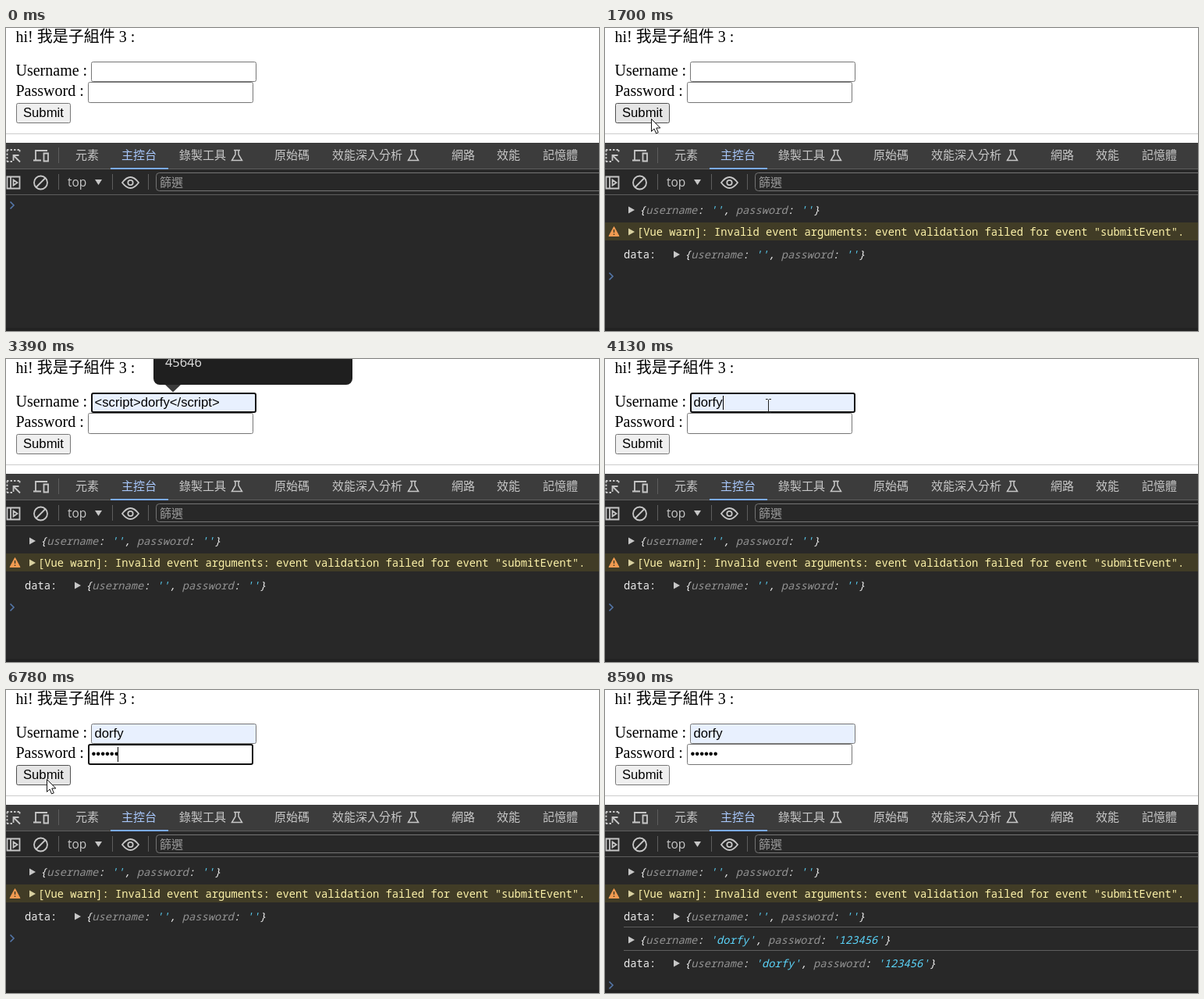
Write an HTML page that moves like this. It is 760 px wide and 388 px high and loops after 9600 ms.

```html
<!DOCTYPE html>
<html lang="zh-Hant">
<head>
<meta charset="utf-8">
<title>Form events in the console</title>
<style>
  html, body { margin: 0; width: 100%; height: 100%; overflow: hidden; background: #fff; }
  svg { display: block; width: 760px; height: 388px; }
  text { white-space: pre; }
  .page { font: 20px "Liberation Serif", "Noto Sans CJK TC", "Noto Sans CJK JP", serif; }
  .thin { font-weight: 300; }
  .field { font: 16.67px "Liberation Sans", sans-serif; }
  .ui { font: 15px "Open Sans", "Noto Sans CJK TC", "Noto Sans CJK JP", sans-serif; fill: #c7c7c7; }
  .log { font: 500 13.75px "Noto Sans Mono", monospace; fill: #ececec; }
  .obj { font-style: italic; }
  .key { fill: #939393; }
  .str { fill: #5cd5fb; }
  .icon { fill: none; stroke: #c7c7c7; stroke-width: 1.8; }
  .sep { stroke: #5e5e5e; }
</style>
</head>
<body>
<svg id="stage" viewBox="0 0 760 388">
  <rect width="760" height="388" fill="#fff"/>
  <g class="page">
    <text class="thin" x="12.5" y="18">hi! 我是子組件 3 :</text>
    <text x="12.5" y="61">Username :</text>
    <text x="12.5" y="87">Password :</text>
  </g>
  <rect id="userBox" rx="2"/>
  <rect id="passBox" rx="2"/>
  <rect id="button" x="13.5" y="96.5" width="69" height="25" rx="2"/>
  <g class="field">
    <text id="user" x="113.5" y="61"></text>
    <text id="pass" x="109.5" y="87"></text>
    <text x="22" y="114">Submit</text>
  </g>
  <rect id="caret" width="1"/>
  <path d="M0 135.5H760" stroke="#ccc"/>

  <rect y="147" width="760" height="241" fill="#282828"/>
  <rect y="147" width="760" height="33" fill="#3c3c3c"/>
  <path class="sep" d="M0 180.5H760M0 213.5H760M67.5 153V173M67.5 187V207M136.5 187V207M182.5 187V207"/>
  <rect x="134" y="179" width="74" height="2" fill="#7cacf8"/>
  <rect y="384" width="760" height="4" fill="#222"/>
  <g id="tabs" class="ui"></g>
  <g class="icon">
    <path d="M1 156h17" stroke-dasharray="2.5 2"/>
    <path d="M1.5 156v15M17.5 156v4M1 171h7" stroke-dasharray="2.5 2"/>
    <path d="M18 171.5l-8-8M9.5 170v-7h7"/>
    <path d="M38 169v-12h15M35 169.5h10M48.5 160.5h5.5v10h-5.5z"/>
    <path d="M1.5 190.5h16v15h-16zM6 190v16M9.5 194.5v7l5-3.5z"/>
    <circle cx="44.5" cy="198" r="8.5"/><path d="M38.5 204l12-12"/>
    <path d="M149 198q10.5-14 21 0q-10.5 14-21 0z"/><circle cx="159.5" cy="198" r="3.2"/>
  </g>
  <text class="ui" x="79" y="203" style="font-size:15.5px">top</text>
  <path d="M114 194h9l-4.5 7z" fill="#c7c7c7"/>
  <rect x="192.5" y="185.5" width="600" height="23" rx="4" fill="#282828" stroke="#757575"/>
  <text class="ui" x="197" y="203" style="fill:#9a9a9a">篩選</text>

  <g id="first" class="log"></g>
  <g id="second" class="log"></g>
  <path id="prompt" d="M5.5 -4.5l4.5 4.5l-4.5 4.5" fill="none" stroke="#5577aa" stroke-width="1.6"/>

  <g id="popup">
    <path d="M203 32h22l-11 10.5z" fill="#3a3a3a"/>
    <rect x="189" y="-60" width="255" height="93" rx="8" fill="#1f1f1f"/>
    <text class="ui" x="204" y="10" style="font-size:16.4px;fill:#e3e3e3">45646</text>
  </g>
  <circle id="halo" r="15" fill="#f7e44c" style="mix-blend-mode:multiply"/>
  <path id="arrow" d="M.5 .5V16.5L4 13L6.5 19L9.3 17.8L6.8 12H11.8z" fill="#fff" stroke="#111"/>
  <path id="beam" d="M-3 -8.5H-.5L.5 -7.5L1.5 -8.5H4M.5 -7.5V7.5M-3 8.5H-.5L.5 7.5L1.5 8.5H4" fill="none" stroke="#222"/>
</svg>
<script>
const LOOP = 9600;
const NAME = 'dorfy';
const $ = id => document.getElementById(id);
const set = (id, attrs) => { for (const k in attrs) $(id).setAttribute(k, attrs[k]); };
const show = (id, on) => set(id, { visibility: on ? 'visible' : 'hidden' });
const within = (t, spans) => spans.some(([a, b]) => t >= a && t < b);

// Static parts
const flask = x => `<path class="icon" style="stroke-width:1.5" transform="translate(${x} 163)"
  d="M-4-6.5h8M-2-6v5l-4.5 7.5h13l-4.5-7.5v-5"/>`;
const tabs = [[89, '元素'], [148, '主控台'], [222, '錄製工具'], [344, '原始碼'],
  [418, '效能深入分析'], [571, '網路'], [629, '效能'], [688, '記憶體']];
$('tabs').innerHTML = tabs.map(([x, s]) =>
  `<text x="${x}" y="168"${x === 148 ? ' style="fill:#a8c7fa"' : ''}>${s}</text>`).join('') + flask(296) + flask(522);

const expander = (x, y, color = '#c7c7c7') =>
  `<path d="M${x} ${y - 4.5}l8 4.5l-8 4.5z" fill="${color}"/>`;
const entry = (x, y, user, pass) => {
  const pair = (key, value) => `<tspan class="key">${key}</tspan>: <tspan class="str">'${value}'</tspan>`;
  return expander(x - 14, y) +
    `<text class="obj" x="${x}" y="${y + 5}">{${pair('username', user)}, ${pair('password', pass)}}</text>`;
};
const label = y => `<text x="24" y="${y + 5}">data:</text>`;

$('first').innerHTML = entry(44, 233, '', '') +
  `<rect y="249" width="760" height="23" fill="#413c26"/>
   <path d="M11.5 254.5l6.5 12h-13z" fill="#f29b52" stroke="#f29b52" stroke-linejoin="round"/>
   <path d="M11.5 258v4M11.5 263.5v1.5" stroke="#413c26" stroke-width="1.5"/>` +
  expander(30, 261, '#d8d0a0') +
  `<text x="41" y="266" style="fill:#fdf3aa">[Vue warn]: Invalid event arguments: event validation failed for event "submitEvent".</text>` +
  label(290) + entry(102, 290, '', '');
$('second').innerHTML = '<path class="sep" d="M24 303.5H760M24 333.5H760"/>' +
  entry(44, 320, NAME, '123456') + label(350) + entry(102, 350, NAME, '123456');

// Pointer path: time, x, y
const path = [
  [200, 688, 325], [410, 505, 106], [550, 350, 95], [830, 110, 102], [1040, 59, 116],
  [2380, 59, 116], [2720, 170, 67],
  [3120, 170, 67], [3320, 213, -22],
  [3860, 213, -22], [4000, 213, 45], [4130, 209, 60], [4400, 186, 85],
  [6430, 186, 85], [6640, 52, 114],
  [7970, 52, 114], [8590, 690, 390]
];
const STEP = 68;
const pointer = t => {
  const i = path.findIndex(p => p[0] > t) - 1;
  if (i < 0) return null;
  const [t0, x0, y0] = path[i], [t1, x1, y1] = path[i + 1];
  const k = Math.floor((t - t0) / STEP) * STEP / (t1 - t0);
  return [Math.round(x0 + (x1 - x0) * k), Math.round(y0 + (y1 - y0) * k)];
};
const over = (p, x, y, w, h) => p[0] >= x && p[0] < x + w && p[1] >= y && p[1] < y + h;

const clicks = [[1500, 1700], [2720, 2860], [4470, 4610], [7110, 7310]];
const presses = [clicks[0], clicks[3]];
const carets = [[2860, 3320], [3930, 5010], [5210, 6230], [6780, 7110]];
const keys = [5210, 5280, 5350, 5550, 5620, 5680];

function field(id, x, y, w, h, focused, fill) {
  const line = focused ? 2 : 1;
  set(id, {
    x: x + line / 2, y: y + line / 2, width: w - line, height: h - line, fill,
    stroke: focused ? '#101010' : '#767676', 'stroke-width': line
  });
}

function render(t) {
  const filled = t >= 3320;
  const typed = keys.filter(k => t >= k).length;
  const inUser = t >= 2860 && t < 4470;
  const inPass = t >= 4470 && t < 7110;

  field('userBox', 109, 43, 212, 26, inUser, filled ? '#e8f0fe' : '#fff');
  field('passBox', 105, 69, 212, 27, inPass, '#fff');
  $('user').textContent = !filled ? '' : t < 3530 ? `<script>${NAME}<\/script>` : NAME;
  $('pass').textContent = '•'.repeat(typed);

  show('caret', within(t, carets));
  set('caret', inPass
    ? { x: Math.floor(109 + 5.75 * typed), y: 73, height: 19 }
    : { x: filled ? 151 : 114, y: 47, height: 18 });

  show('popup', t >= 2920 && t < 3930);
  show('first', t >= 1640);
  show('second', t >= 7240);
  set('prompt', { transform: `translate(0 ${t < 1640 ? 227 : t < 7240 ? 318 : 378})` });

  const p = pointer(t);
  const onButton = p && over(p, 13, 96, 70, 26);
  const onField = p && (over(p, 109, 46, 212, 23) || over(p, 105, 69, 212, 27));
  const pressed = within(t, presses);
  set('button', {
    fill: pressed ? '#f5f5f5' : onButton ? '#e5e5e5' : '#efefef',
    stroke: pressed ? '#8d8d8d' : onButton ? '#4f4f4f' : '#767676'
  });
  show('arrow', p && !onField);
  show('beam', onField);
  show('halo', p && within(t, clicks));
  if (p) for (const id of ['arrow', 'beam', 'halo']) set(id, { transform: `translate(${p})` });
}

const start = performance.now();
function tick() {
  render((performance.now() - start) % LOOP);
  requestAnimationFrame(tick);
}
tick();
</script>
</body>
</html>
```
